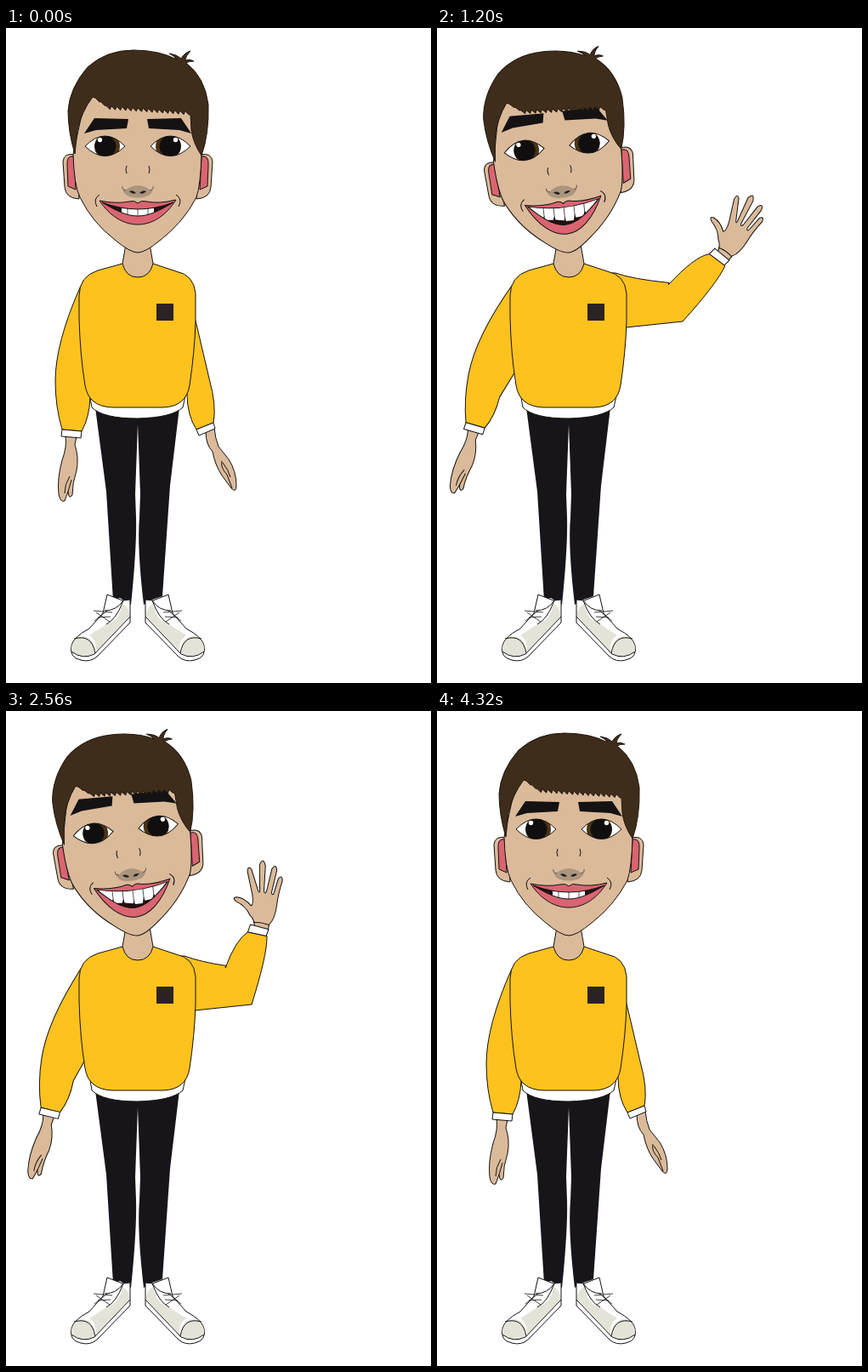
Animation, 500 px wide and 770 px high, one loop 4800 ms. Source, as an HTML page with a canvas:

```html
<!DOCTYPE html>
<html lang="en">
<head>
<meta charset="utf-8">
<title>Waving character</title>
<style>
  html, body { margin: 0; width: 100%; height: 100%; overflow: hidden; background: #fff; }
  canvas { display: block; }
</style>
</head>
<body>
<canvas id="stage" width="500" height="770"></canvas>
<script>
const ctx = document.getElementById('stage').getContext('2d');
const LOOP = 4800, STEP = 40, WAVE_END = 3400;
const SKIN = '#dbba9a', YELLOW = '#fec21e', PINK = '#da6471', BLACK = '#17151a',
      HAIR = '#3f2d1b', SHADE = '#e3e3d8', LINE = '#111';

const clamp = v => Math.max(0, Math.min(1, v));
const lerp = (a, b, k) => a + (b - a) * k;
const ramp = (t, from, to) => clamp((t - from) / (to - from));
const smooth = k => (1 - Math.cos(Math.PI * k)) / 2;
const rad = deg => deg * Math.PI / 180;

function shape(d, fill, stroke = LINE, width = 1) {
  const path = new Path2D(d);
  if (fill) { ctx.fillStyle = fill; ctx.fill(path); }
  if (stroke) { ctx.strokeStyle = stroke; ctx.lineWidth = width; ctx.stroke(path); }
}
function disc(x, y, r, fill) {
  ctx.fillStyle = fill;
  ctx.beginPath();
  ctx.arc(x, y, r, 0, 7);
  ctx.fill();
}
function group(draw) { ctx.save(); draw(); ctx.restore(); }
function turned(x, y, deg, draw) {
  group(() => {
    ctx.translate(x, y);
    ctx.rotate(rad(deg));
    ctx.translate(-x, -y);
    draw();
  });
}
// Draws a left-hand part and its reflection about the body axis x = 155.
function bothSides(draw) {
  draw();
  group(() => { ctx.translate(310, 0); ctx.scale(-1, 1); draw(); });
}

function pose(t) {
  const edge = Math.max(0, Math.min(t, WAVE_END - t));
  const swing = time => 20 - 20 * Math.cos(2 * Math.PI * (time - 800) / 615);
  let forearm = swing(t);
  if (t < 560) forearm = lerp(94, swing(560), ramp(t, 440, 560));
  if (t > 2840) forearm = lerp(swing(2840), 94, ramp(t, 2840, 2960));
  const out = 1 - (1 - ramp(t, 0, 480)) ** 2;
  return {
    raise: 71.5 * clamp(edge / 440),
    bent: t > 440 && t < 2960,
    forearm,
    leftArm: 11.2 * (out - smooth(ramp(t, 2440, 2820))),
    tilt: -6.5 * (smooth(ramp(t, 160, 820)) - smooth(ramp(t, 2800, 3400))),
    smile: smooth(ramp(edge, 20, 280)),
    sway: edge < 640 ? Math.sin(Math.PI * edge / 640) ** 2 : 0,
    blink: t >= 4200 && t < 4320
  };
}

function leftArm(angle) {
  turned(92, 305, angle, () => {
    shape('M70 480Q72 492 66 508Q60 530 62 548Q64 558 69 556L73 545Q74 555 78 549Q78 535 83 520Q86 505 81 490L83 480Z', SKIN);
    shape('M75 527Q69 536 69 547M73 545L77 531', null);
    shape('M88 303Q58 370 58 415Q58 445 66 472L89 474Q98 458 99 435L111 403L115 320Z', YELLOW);
    shape('M66 472L89 474L88 482L65 480Z', '#fff');
  });
}

const HANGING = [[212, 300], [226, 355], [239, 412], [248, 444], [244, 464], [224, 472],
                 [213, 455], [213, 430], [200, 360], [246, 471], [227, 479]];
const LIFTED = [[223, 301], [234, 359], [247, 412], [254, 444], [245.5, 458.5], [226, 467.5],
                [209, 453], [197, 411], [170, 352], [249, 466], [229, 475]];

function straightArm(raise) {
  const k = clamp(raise / 52);
  const p = HANGING.map((q, i) => q.map((v, j) => lerp(v, LIFTED[i][j], k)));
  turned(208, 305, -raise, () => {
    shape('M235 474Q235 490 243 498Q246 514 254 526L265 541Q271 547 271 538Q271 521 262 507L250 492Q246 482 245 470Z', SKIN);
    shape('M254 509Q252 517 260 525L266 541M255 511Q262 520 264 528', null);
    shape(`M${p[0]}Q${p[1]} ${p[2]}Q${p[3]} ${p[4]}L${p[5]}Q${p[6]} ${p[7]}L${p[8]}Z`, YELLOW);
    shape(`M${p[4]}L${p[9]}L${p[10]}L${p[5]}Z`, '#fff');
  });
}

function bentArm(angle) {
  const elbow = [289, 345], c = Math.cos(rad(angle)), s = Math.sin(rad(angle));
  const at = (x, y) => {
    const dx = x - elbow[0], dy = y - elbow[1];
    return [elbow[0] + dx * c - dy * s, elbow[1] + dx * s + dy * c];
  };
  const inner = 254 + Math.min(angle, 60) * .57;
  turned(...elbow, angle, () => {
    shape('M281 256Q281 246 274 241Q268 231 256 227Q250 223 256 222Q266 222 274 230Q277 228 274 217L265 191Q264 183 269 187L280 211Q282 215 282 211L278 181Q281 171 285 181L287 211Q288 215 290 211L293 184Q297 176 299 185L296 212Q298 216 299 211L302 194Q306 189 307 196Q304 212 304 224Q304 242 298 249L297 257Z', SKIN);
    shape('M279 249Q289 247 298 250', null);
  });
  shape(`M200 288L210 288Q229 295 ${inner + 1} 299.5L${inner} 302Q${at(261, 272)} ${at(274, 261)}` +
        `L${at(297, 263)}Q${at(300, 285)} ${elbow}L222 352L200 352Z`, YELLOW);
  turned(...elbow, angle, () => shape('M276 252L298 255L296 263L274 261Z', '#fff'));
}

function legs(sway) {
  const hip = -sway, knee = -9 * sway;
  shape(`M${105 + hip} 446L${118 + knee} 545L126 673L134 670L147 678Q154 610 ${153 + knee} 575L${152 + knee} 548L${155 + hip} 466L${155 + hip} 446Z`, BLACK, null);
  shape(`M${204 + hip} 446L193 538L184 668L172 672L162 678Q154 610 157 575L158 548L${155 + hip} 466L${155 + hip} 446Z`, BLACK, null);
}

function shoe() {
  shape('M119 666L137 673L146 672L146 699L107 739Q99 746 88 743Q74 740 77 726Q79 716 98 706L114 688Z', '#fff');
  shape('M137 677Q146 682 145 692L106 733Q107 719 98 714L118 701Q133 698 137 677Z', SHADE, null);
  shape('M77 728Q80 715 92 715Q105 718 104 735Q90 743 77 732Z', SHADE, null);
  shape('M77 733Q90 743 104 736L146 692M80 718Q101 712 105 735M116 685Q130 685 138 673Q130 695 118 701', null);
  shape('M103 685L125 687M104 697L119 685M106 687L122 698M108 693L123 692', null, LINE, .8);
}

function torso() {
  shape('M98 428L101 446Q114 459 155 459Q195 458 208 446L212 428Z', '#fff');
  shape('M137 277L108 285Q86 292 86 315L86 340Q87 384 93 420Q97 445 125 446L185 446Q212 445 216 420Q222 380 223 345L223 312Q221 290 200 286L173 277Z', YELLOW);
  shape('M141 254L137 277Q141 293 155 293Q169 293 173 277L169 254Z', SKIN);
  ctx.fillStyle = '#2b2323';
  ctx.fillRect(177, 324, 20, 20);
}

function eye(closed) {
  const almond = 'M93 139Q116.5 115 140 139Q116.5 162 93 139Z';
  if (closed) {
    shape(almond, SKIN, null);
    shape('M93 139Q116.5 162 140 139', null, LINE, 1.3);
    return;
  }
  shape(almond, '#fff', null);
  group(() => {
    ctx.clip(new Path2D(almond));
    disc(119, 139, 15, '#4c3314');
    disc(117, 139, 12.5, '#110e0f');
  });
  disc(110.5, 131.5, 2.7, '#fff');
  shape(almond, null);
}

function mouth(open) {
  const y = (shut, wide) => lerp(shut, wide, open);
  const low = y(231, 242), inner = y(221, 231), side = y(215, 222);
  const top = `M113 205Q155 ${y(221, 216)} 197 205`;
  shape(`M110 203Q130 207 145 204Q151 202 155 206Q159 202 165 204Q180 207 200 202C188 ${y(221, 227)} 172 ${low} 155 ${low}C138 ${low} 122 ${y(221, 227)} 110 203Z`, PINK);
  const gap = new Path2D(`${top}C180 ${side} 168 ${inner} 155 ${inner}C142 ${inner} 130 ${side} 113 205Z`);
  ctx.fillStyle = '#21100f';
  ctx.fill(gap);
  group(() => {
    ctx.clip(gap);
    // Centre teeth show first; the outer ones are revealed as the mouth widens.
    const left = y(136, 113), right = y(174, 197);
    const bottom = y(222, 227);
    shape(`M${left} 204L${right} 204L${y(174, 181)} 221L179 217L177 223L168 224L167 219L165 ${bottom}L156 ${bottom}L155 221L154 ${bottom - 1}L144 224L143 219L141 224L132 223L131 218L${y(136, 129)} 221Z`, '#fff', null);
    shape('M131 206L131 219M143 206L143 221M155 206L155 223M167 206L167 221M179 206L179 218', null, '#333', .8);
  });
  ctx.strokeStyle = LINE;
  ctx.lineWidth = 1;
  ctx.stroke(gap);
}

function hair() {
  let fringe = '';
  for (let i = 1; i <= 18; i++) {
    const x = 217 - i * 6.2;
    const base = 101 - i * .42 - Math.max(0, i - 16) * 4;
    fringe += `L${x + 4.5} ${base + 1.5}L${x} ${base - 3}`;
  }
  shape('M81 148Q73 122 73 97Q75 70 96 46Q118 26 150 26Q180 26 201 37Q197 32 192 30Q201 31 206 36Q210 29 217 27Q211 33 211 38Q216 36 221 39Q215 39 212 41Q234 58 238 90Q239 125 230 150Q220 135 218 120L217 102' +
        fringe + 'L102 81Q89 98 84 120Z', HAIR, '#20170f');
}

function head({ tilt, smile, blink }) {
  turned(155, 263, tilt, () => {
    bothSides(() => {
      shape('M82 149Q68 146 67 157L69 187Q70 200 86 201Z', SKIN);
      shape('M80 151Q71 149 72 162L73 186L82 190Z', PINK);
    });
    shape('M79 148Q80 185 87 199Q101 228 128 249Q146 264 155 264Q164 264 182 249Q209 228 224 199Q229 185 230 148L216 70L96 70Z', SKIN);
    bothSides(() => {
      shape(`M92 ${124 - 9 * smile}l12 -18l40 1l-2 11l-36 2Z`, '#151213', null);
      eye(blink);
      shape('M142 162Q140 166 142 171M110 196Q102 201 107 210', null);
    });
    hair();
    shape('M137 188Q140 192 144 188Q155 182 166 188Q170 192 173 188Q172 196 165 198Q155 201 145 198Q138 196 137 188Z', '#ab957e', null);
    shape('M137 186Q136 190 141 191M173 186Q174 190 169 191', null, '#66594c');
    bothSides(() => shape('M145 192Q149 190 153 194Q149 196 145 192Z', '#211b19', null));
    mouth(smile);
  });
}

function draw(t) {
  const p = pose(t);
  ctx.fillStyle = '#fff';
  ctx.fillRect(0, 0, 500, 770);
  ctx.lineJoin = 'round';
  legs(p.sway);
  bothSides(shoe);
  group(() => {
    ctx.translate(-p.sway, 0);
    leftArm(p.leftArm);
    if (p.bent) bentArm(p.forearm);
    else straightArm(p.raise);
    torso();
    head(p);
  });
}

function tick() {
  const t = performance.now() % LOOP;
  draw(Math.floor(t / STEP) * STEP);
  requestAnimationFrame(tick);
}
tick();
</script>
</body>
</html>
```
